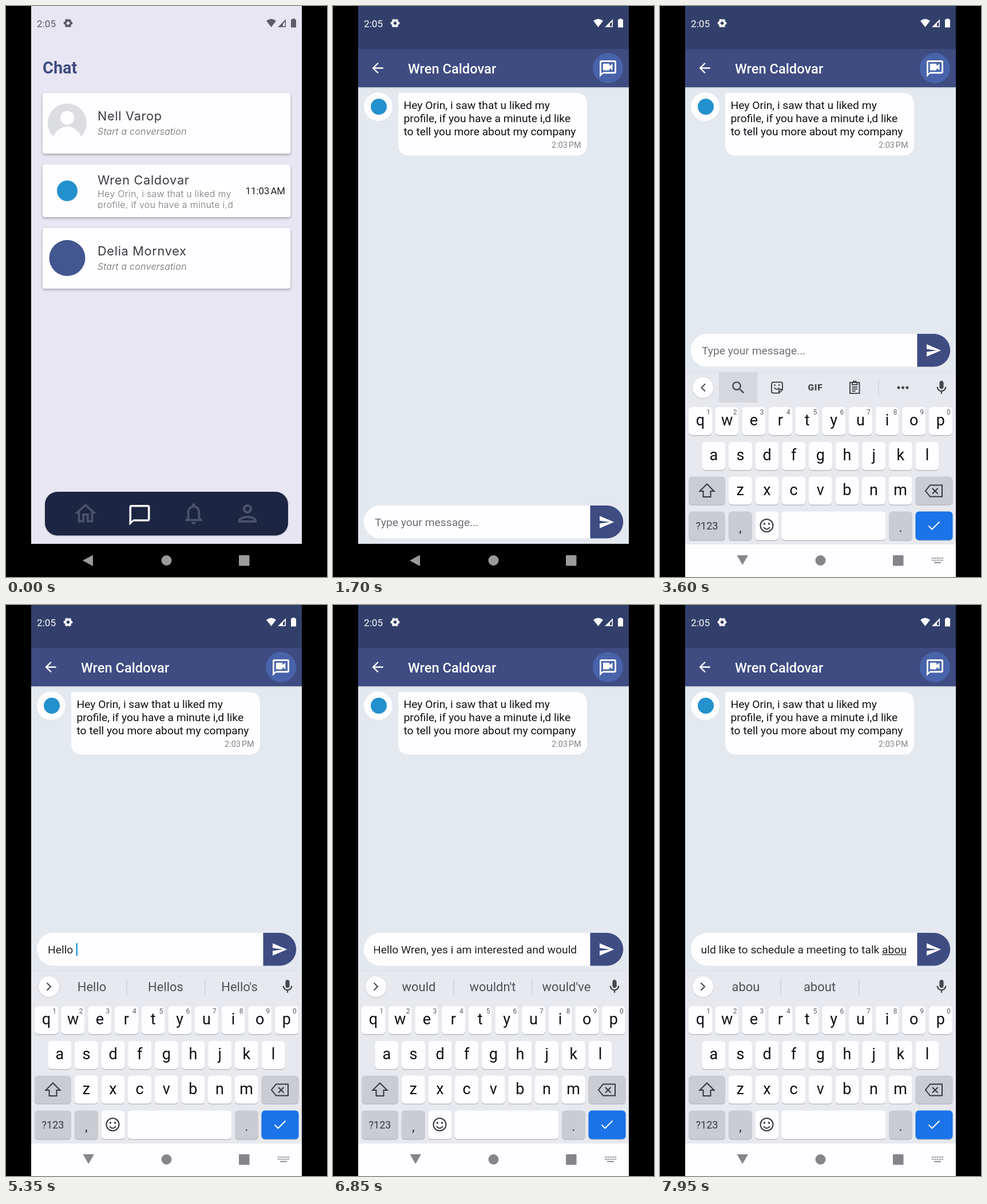
Recreate the animation shown at these times as an HTML page. Size 561x998 px, loop 8 s.

```html
<!DOCTYPE html>
<html lang="en">
<head>
<meta charset="utf-8">
<title>Chat</title>
<style>
  html, body { margin: 0; width: 100%; height: 100%; overflow: hidden; background: #000; }
  svg { display: block; width: 100%; height: 100%; }
  text { font-family: Roboto, sans-serif; white-space: pre; }
  .wide { font-family: Inter, sans-serif; }
  .light { font-weight: 300; letter-spacing: .28px; }
  .mid { text-anchor: middle; }
  .end { text-anchor: end; }
  .card { filter: drop-shadow(0 2px 2px rgba(0,0,0,.3)); }
  .soft { filter: drop-shadow(0 1px 1.5px rgba(0,0,0,.14)); }
</style>
</head>
<body>
<svg id="stage" viewBox="0 0 561 998"></svg>
<script>
const LOOP = 8000;
const NAVY = '#3e4c82', WHITE = '#fefdff', PAPER = '#e4e8ef';
const MESSAGE = 'Hello Wren, yes i am interested and would like to schedule a meeting to talk about';
const upTo = words => MESSAGE.indexOf(words) + words.length;
// [time, typed characters]
const TYPING = [
  [4500, 0], [5300, upTo('Hello ')], [5450, upTo('Hello ')],
  [6800, upTo('would ')], [6900, upTo('would ')], [7930, MESSAGE.length - 1]
];
const SUGGESTIONS = { Hello: ['Hellos', "Hello's"], would: ["wouldn't", "would've"] };

const PATHS = {
  back: 'M20 11H7.83l5.59-5.59L12 4l-8 8 8 8 1.41-1.41L7.83 13H20z',
  bubble: 'M20 2H4c-1.1 0-2 .9-2 2v18l4-4h14c1.1 0 2-.9 2-2V4c0-1.1-.9-2-2-2zm0 14H6l-2 2V4h16z',
  camera: 'M7 6h6q1 0 1 1v1.7L17.5 6v8L14 11.3V13q0 1-1 1H7q-1 0-1-1V7q0-1 1-1z',
  send: 'M2 21 23 12 2 3v7l15 2-15 2z',
  home: 'M12 5.69l5 4.5V18h-2v-6H9v6H7v-7.81l5-4.5M12 3L2 12h3v8h6v-6h2v6h6v-8h3z',
  bell: 'M12 22c1.1 0 2-.9 2-2h-4c0 1.1.9 2 2 2zm6-6v-5c0-3.07-1.63-5.64-4.5-6.32V4c0-.83-.67-1.5-1.5-1.5s-1.5.67-1.5 1.5v.68C7.64 5.36 6 7.92 6 11v5l-2 2v1h16v-1zm-2 1H8v-6c0-2.48 1.51-4.5 4-4.5s4 2.02 4 4.5z',
  person: 'M12 6c1.1 0 2 .9 2 2s-.9 2-2 2-2-.9-2-2 .9-2 2-2m0 10c2.7 0 5.8 1.29 6 2H6c.23-.72 3.31-2 6-2m0-12C9.79 4 8 5.79 8 8s1.79 4 4 4 4-1.79 4-4-1.79-4-4-4zm0 10c-2.67 0-8 1.34-8 4v2h16v-2c0-2.66-5.33-4-8-4z',
  mic: 'M12 14c1.66 0 3-1.34 3-3V5c0-1.66-1.34-3-3-3S9 3.34 9 5v6c0 1.66 1.34 3 3 3zm5-3c0 2.76-2.24 5-5 5s-5-2.24-5-5H5c0 3.53 2.61 6.43 6 6.92V21h2v-3.08c3.39-.49 6-3.39 6-6.92z',
  search: 'M15.5 14h-.79l-.28-.27C15.41 12.59 16 11.11 16 9.5 16 5.91 13.09 3 9.5 3S3 5.91 3 9.5 5.91 16 9.5 16c1.61 0 3.09-.59 4.23-1.57l.27.28v.79l5 4.99L20.49 19zm-6 0C7.01 14 5 11.99 5 9.5S7.01 5 9.5 5 14 7.01 14 9.5 11.99 14 9.5 14z'
};

const rect = (x, y, w, h, fill, more = '') =>
  `<rect x="${x}" y="${y}" width="${w}" height="${h}" fill="${fill}" ${more}/>`;
const circle = (x, y, r, fill, more = '') =>
  `<circle cx="${x}" cy="${y}" r="${r}" fill="${fill}" ${more}/>`;
const text = (x, y, size, fill, str, more = '') =>
  `<text x="${x}" y="${y}" font-size="${size}" fill="${fill}" ${more}>${str}</text>`;
const clock = (x, y, size, fill, time, half) =>
  text(x, y, size, fill, `${time}<tspan dx="2">${half}</tspan>`, 'class="end"');
const shape = (d, fill) => `<path d="${d}" fill="${fill}" fill-rule="evenodd"/>`;
const line = (d, color, width = 2) =>
  `<path d="${d}" fill="none" stroke="${color}" stroke-width="${width}"/>`;
const icon = (name, x, y, scale, fill) =>
  `<path transform="translate(${x} ${y}) scale(${scale}) translate(-12 -12)" d="${PATHS[name]}" fill="${fill}"/>`;
const group = (id, body, more = '') => `<g id="${id}" ${more}>${body}</g>`;

const statusIcons = color =>
  text(54, 36.5, 17.2, color, '2:05') +
  circle(108.5, 30, 4.6, 'none', `stroke="${color}" stroke-width="3.6"`) +
  circle(108.5, 30, 6.6, 'none', `stroke="${color}" stroke-width="2.4" stroke-dasharray="4 2.91" stroke-dashoffset="2"`) +
  shape('M455 26Q463.5 19 472 26L463.5 37Z', color) +
  shape('M475 37 489 23V37ZM484 31V35.5H487.5V27.5Z', color) +
  shape('M500.5 22h4v1.5h2.5V37.5h-9V23.5h2.5z', color);

const card = (y, h) => rect(64, y, 433, h, WHITE, 'rx="4" class="card"');
const name = (y, str) => text(160, y, 21.7, '#3b3b40', str, 'class="wide" letter-spacing=".7"');
const invite = y => text(160, y, 16, '#66666b', 'Start a conversation', 'class="wide light" font-style="italic"');
const preview = (y, str) => text(160, y, 16, '#77777c', str, 'class="wide light" clip-path="url(#previewClip)"');

const listScreen =
  rect(44, 0, 473, 940, PAPER, 'id="paper"') + statusIcons('#5b5d63') +
  text(64, 118, 28.9, NAVY, 'Chat', 'font-weight="700"') +
  card(152, 106) + card(277, 92) + card(388, 106) +
  circle(107, 204.5, 34, '#dcdde1') + circle(107, 195.5, 12, WHITE) +
  `<ellipse cx="107" cy="238" rx="26" ry="27" fill="${WHITE}" clip-path="url(#faceClip)"/>` +
  name(199.5, 'Nell Varop') + invite(224.5) +
  circle(107, 323, 18, '#2391cc') + name(312, 'Wren Caldovar') +
  preview(333.5, 'Hey Orin, i saw that u liked my') +
  preview(353, 'profile, if you have a minute i,d') +
  clock(488, 328.5, 16.8, '#202024', '11:03', 'AM') +
  circle(107, 440.5, 31.5, '#42568f') + name(435.5, 'Delia Mornvex') + invite(460.5) +
  rect(68, 849, 425, 76.5, '#1c2541', 'rx="22" class="soft"') +
  icon('home', 139, 887, 1.93, '#4b526b') + icon('bubble', 233.5, 890, 1.8, WHITE) +
  icon('bell', 328, 887, 1.88, '#4b526b') + icon('person', 422, 887, 2, '#4b526b');

const chatScreen =
  rect(44, 0, 473, 940, PAPER) +
  rect(44, 75, 473, 67, NAVY, 'class="soft"') + rect(44, 0, 473, 75, '#323f6b') +
  statusIcons('#fff') + icon('back', 78, 108.5, 1.2, '#fff') +
  text(131, 117.5, 23.7, '#fff', 'Wren Caldovar', 'font-weight="500"') +
  circle(480.5, 108.5, 26.5, '#4863a9') +
  icon('bubble', 480.5, 109.5, 1.45, '#fff') + icon('camera', 480.5, 109.5, 1.45, '#fff') +
  circle(79, 176, 25, WHITE) + circle(80, 176, 14, '#2391cc') +
  shape('M114 152H424Q444 152 444 172V242Q444 261.5 424 261.5H134Q114 261.5 114 242Z', WHITE) +
  ['Hey Orin, i saw that u liked my', 'profile, if you have a minute i,d like', 'to tell you more about my company']
    .map((str, i) => text(123.5, 179.5 + i * 23, 19.27, '#101014', str)).join('') +
  clock(433.5, 248, 14.4, '#85858a', '2:03', 'PM');

const inputBar =
  shape('M449.5 873H82.5a28.5 28.5 0 0 0 0 57.5H449.5z', WHITE) +
  shape('M449.5 873H478.5a28.5 28.5 0 0 1 0 57.5H449.5z', NAVY) +
  icon('send', 478, 902, 1.2, '#fff') +
  text(73, 908.5, 19.27, '#6f7075', 'Type your message...', 'id="hint"') +
  group('field', text(73, 908.5, 19.27, '#202024', '', 'id="typed"') +
    rect(0, 910.5, 0, 1.3, '#202024', 'id="underline"') +
    rect(0, 891, 2.4, 22, '#1b9ad2', 'id="caret"'), 'clip-path="url(#fieldClip)"');

const PITCH = 46.65, INK = '#45484e', GREY = '#caccd2';
const key = (x, y, w, fill = WHITE, h = 49) =>
  rect(x, y + 1.5, w, h, '#b9bcc3', 'rx="6"') + rect(x, y, w, h, fill, 'rx="6"');
const letters = (row, x, y) => [...row].map((c, i) =>
  key(x + i * PITCH, y, 41) +
  text(x + 20.5 + i * PITCH, y + 32, 27, '#101014', c, 'class="mid"')).join('');

const toolbar =
  rect(103, 640, 67.5, 53, '#d5d7dc') + circle(75, 667, 18, WHITE, 'class="soft"') +
  line('M79 660.5 72.5 667l6.5 6.5', INK) + icon('search', 137, 667, 1.2, INK) +
  line('M198 657.5h13q3 0 3 3v10l-6 6h-10q-3 0-3-3v-13q0-3 3-3zM214 670h-6v6M199.5 667q4.5 6 9 0M199 662.5h3M207 662.5h3', INK) +
  text(271.5, 672, 15.5, INK, 'GIF', 'class="mid" font-weight="900" letter-spacing=".8"') +
  line('M332 658h16.5v19H332zM336 658v4h8.5v-4M335.5 666h9.5M335.5 669.5h9.5M335.5 673h6', INK) +
  shape('M337 655h6.5v4H337z', INK) + rect(381.5, 653, 1, 27, '#c6c9cf') +
  [417, 424.5, 432].map(x => circle(x, 667, 2.5, INK)).join('');
const strip =
  circle(75, 667, 18, WHITE, 'class="soft"') + line('M71.5 660.5 78 667l-6.5 6.5', INK) +
  rect(210.5, 653, 1, 28, '#c3c6cc') + rect(347.5, 653, 1, 28, '#c3c6cc') +
  [150, 279, 408].map((x, i) => text(x, 675, 22, '#4c5057', '', `class="mid" id="word${i}"`)).join('');

const keyboard =
  rect(44, 640, 473, 301, '#e7e9ee') + rect(44, 639.5, 473, 1, '#dcdfe5') +
  group('toolbar', toolbar) + group('strip', strip) + icon('mic', 492, 667, 1.2, INK) +
  letters('qwertyuiop', 50, 701) +
  [...'1234567890'].map((d, i) => text(84.5 + i * PITCH, 714, 12, '#5a5d63', d, 'class="mid"')).join('') +
  letters('asdfghjkl', 73.3, 762) + letters('zxcvbnm', 119.8, 822.5) +
  key(50, 822.5, 64, GREY) + line('M82 835.5 69.5 848h6v10h13v-10h6z', '#34373c') +
  key(446.5, 822.5, 65, GREY) +
  line('M472 837.5h21v20h-21l-8-10zM476 843l9.5 9.5M485.5 843l-9.5 9.5', '#34373c') +
  key(50, 883.5, 64, GREY, 50) + text(82, 914.5, 18, '#34373c', '?123', 'class="mid"') +
  key(119.8, 883.5, 41, GREY, 50) + text(140.5, 919, 22, '#202024', ',', 'class="mid"') +
  key(166.4, 883.5, 41, WHITE, 50) + circle(186.5, 908, 11, 'none', 'stroke="#34373c" stroke-width="2"') +
  circle(182.5, 905, 1.7, '#34373c') + circle(190.5, 905, 1.7, '#34373c') +
  line('M181 911q5.5 7 11 0', '#34373c') +
  key(212.5, 883.5, 182, WHITE, 50) +
  key(400, 883.5, 41, GREY, 50) + text(420.5, 919, 22, '#202024', '.', 'class="mid"') +
  key(446.5, 883.5, 65, '#1a73e8', 50) + line('M469.5 908.5l6 6 13-13', '#fff');

const navShapes = color => circle(280.5, 969, 9, color) + rect(407, 960, 18.5, 18.5, color, 'rx="1"');
const keypad = line('M475 965h20M475 968.7h20', '#85858a', 1.9)
  .replace('/>', ' stroke-dasharray="1.9 1.1"/>') + rect(479, 971.8, 12, 1.9, '#85858a');
const darkNav = rect(44, 940, 473, 58, '#000') + shape('M152 959.5v19.5L134 969.2z', '#9b9b9e') + navShapes('#9b9b9e');
const lightNav = rect(44, 940, 473, 58, WHITE) + rect(44, 940, 473, 1, '#e2e3e8') +
  shape('M134.5 960H154L144.2 977z', '#85858a') + navShapes('#85858a') + keypad;

const clip = (id, body) => `<clipPath id="${id}">${body}</clipPath>`;
document.getElementById('stage').innerHTML =
  `<defs>${clip('previewClip', rect(160, 318, 240, 36, '#000'))}${clip('faceClip', circle(107, 204.5, 34, '#000'))}
   ${clip('fieldClip', rect(72, 880, 358.5, 44, '#000'))}${clip('phone', rect(44, 0, 473, 998, '#000'))}</defs>` +
  rect(0, 0, 561, 998, '#000') +
  `<g clip-path="url(#phone)">` + group('list', listScreen) +
  group('chat', chatScreen + group('input', inputBar) + group('keyboard', keyboard)) +
  group('darkNav', darkNav) + group('lightNav', lightNav) + '</g>';

const el = id => document.getElementById(id);
const show = (id, on) => el(id).setAttribute('visibility', on ? 'visible' : 'hidden');
const ramp = (t, from, to) => Math.min(1, Math.max(0, (t - from) / (to - from)));
const easeOut = p => 1 - (1 - p) ** 3;
const mix = (a, b, p) => a.map((v, i) => Math.round(v + (b[i] - v) * p));
const pen = document.createElement('canvas').getContext('2d');
const widthOf = str => { pen.font = '19.27px Roboto, sans-serif'; return pen.measureText(str).width; };

function typedCount(t) {
  let count = 0;
  TYPING.forEach(([time, chars], i) => {
    if (t < time) return;
    const next = TYPING[i + 1];
    count = next ? chars + Math.floor((next[1] - chars) * ramp(t, time, next[0])) : chars;
  });
  return count;
}

function drawField(t, open) {
  const typed = MESSAGE.slice(0, typedCount(t));
  const active = typed.length > 0;
  const word = typed.trim().split(' ').pop();
  const width = widthOf(typed);
  const start = 73 - Math.max(0, width - 358);
  const wordWidth = widthOf(word);
  el('typed').textContent = typed;
  el('typed').setAttribute('x', start);
  el('underline').setAttribute('x', start + width - wordWidth);
  el('underline').setAttribute('width', typed.endsWith(' ') ? 0 : wordWidth);
  el('caret').setAttribute('x', start + width + .5);
  show('caret', active || (t >= 3000 && t % 1000 < 500));
  show('hint', !active);
  show('toolbar', open && !active);
  show('strip', open && active);

  const full = MESSAGE.slice(typed.trim().lastIndexOf(' ') + 1).split(' ')[0].replace(',', '');
  const plain = word.replace(',', '');
  const extra = SUGGESTIONS[plain] || [full === plain ? '' : full, ''];
  [plain, ...extra].forEach((str, i) => el('word' + i).textContent = str);
}

function draw(t) {
  el('paper').setAttribute('fill', `rgb(${mix([233, 230, 243], [228, 232, 239], ramp(t, 50, 500))})`);
  const opening = ramp(t, 1150, 1400);
  el('chat').setAttribute('opacity', opening);
  el('chat').setAttribute('transform', `translate(0 ${60 * (1 - easeOut(opening))})`);
  const rise = 300 * easeOut(ramp(t, 2850, 3100));
  el('input').setAttribute('transform', `translate(0 ${-rise})`);
  el('keyboard').setAttribute('transform', `translate(0 ${300 - rise})`);
  show('keyboard', rise > 0);
  show('lightNav', rise > 0);
  drawField(t, rise > 0);
}

const began = performance.now();
function tick() {
  draw((performance.now() - began) % LOOP);
  requestAnimationFrame(tick);
}
tick();
</script>
</body>
</html>
```
